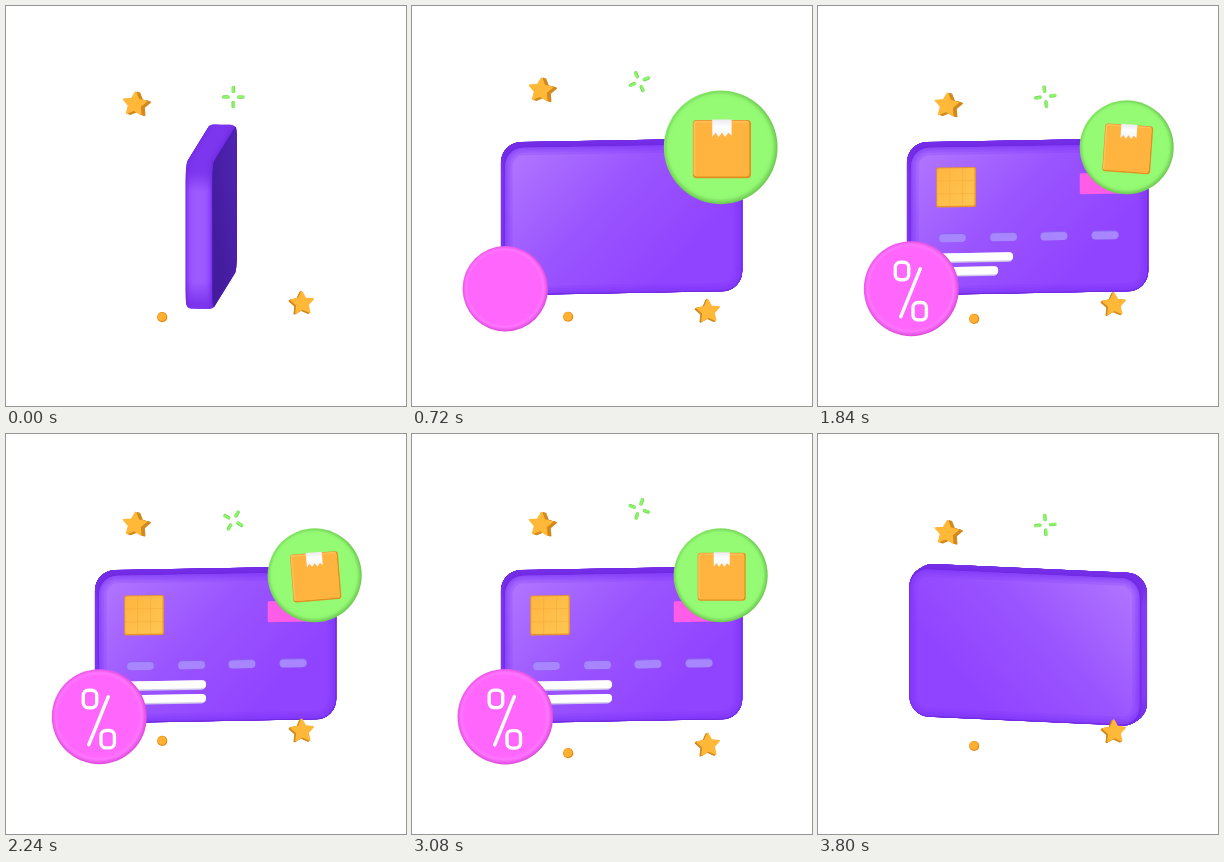
Recreate the animation shown at these times as an HTML page with a canvas. Size 400 by 400 pixels, loop 3840 ms.

```html
<!DOCTYPE html>
<html lang="en">
<head>
<meta charset="utf-8">
<title>Card</title>
<style>
html, body { margin: 0; width: 100%; height: 100%; overflow: hidden; background: #fff; }
canvas { display: block; width: 400px; height: 400px; }
</style>
</head>
<body>
<canvas id="stage" width="400" height="400"></canvas>
<script>
const LOOP = 3840, STEP = 40, TAU = Math.PI * 2, RAD = Math.PI / 180;
const g = document.getElementById('stage').getContext('2d');

const clamp = v => Math.max(0, Math.min(1, v));
const prog = (t, start, len) => clamp((t - start) / len);
const outQuad = p => 1 - (1 - p) * (1 - p);
const outBack = p => p <= 0 ? 0 : 1 + 2.7 * (p - 1) ** 3 + 1.7 * (p - 1) ** 2;
const mix = (a, b, k) => `rgb(${a.map((v, i) => Math.round(v + (b[i] - v) * k))})`;

// Keys are [time, value]; values ease in and out between neighbours.
function track(keys, t) {
  if (t <= keys[0][0]) return keys[0][1];
  for (let i = 1; i < keys.length; i++) {
    const [t0, a] = keys[i - 1], [t1, b] = keys[i];
    if (t < t1) return a + (b - a) * (1 - Math.cos(Math.PI * (t - t0) / (t1 - t0))) / 2;
  }
  return keys[keys.length - 1][1];
}

const PINK_IN = [[400, 0], [560, 1.22], [720, 0.9], [940, 1.11], [1160, 1], [3040, 1], [3300, 1.11]];
const GREEN_IN = [[560, 0], [720, 1.21], [960, 0.9], [1180, 1.11], [1400, 1], [3140, 1], [3410, 1.11]];
const BOX_TILT = [[720, 0], [1240, -6], [1840, 4], [2300, -5], [2680, 0]];

function badgeScale(keys, t) {
  const late = t - keys[keys.length - 1][0];
  return late > 0 ? Math.max(0, 1.11 - 1.22e-5 * late * late) : track(keys, t);
}

const bob = (t, mid, amp, peak) => mid + amp * Math.cos(TAU * (t - peak) / (LOOP / 2));

function at(x, y, draw, scale = 1, turn = 0) {
  if (scale <= 0) return;
  g.save();
  g.translate(x, y);
  g.rotate(turn * RAD);
  g.scale(scale, scale);
  draw();
  g.restore();
}

function roundRect(x, y, w, h, r) {
  g.beginPath();
  g.roundRect(x, y, w, h, r);
}

function pill(x, y, w, h, r, fill) {
  roundRect(x, y, w, h, r);
  g.fillStyle = fill;
  g.fill();
}

function disc(r, fill, x = 0, y = 0) {
  g.beginPath();
  g.arc(x, y, r, 0, TAU);
  g.fillStyle = fill;
  g.fill();
}

function withStops(grad, stops) {
  stops.forEach(([k, c]) => grad.addColorStop(k, c));
  return grad;
}

const linear = (x0, y0, x1, y1, stops) => withStops(g.createLinearGradient(x0, y0, x1, y1), stops);

// ---- card ----
const W = 241, H = 150, DEPTH = 27, PITCH = 0.17, BEVEL = 6;

function yaw(t) {
  if (t < 3265) {
    const p = prog(t, 40, 560);
    return -96 + 102 * (p >= 1 ? 1 : 1 - 2 ** (-10 * p));
  }
  return 6 + 258 * 2 ** (10 * (t - 3265) / 575 - 10);
}

function cardFace(facing) {
  roundRect(-W / 2 + 2, -H / 2 + 2, W - 4, H - 4, 18);
  g.save();
  g.clip();
  const k = clamp((facing - 0.1) / 0.7);
  g.fillStyle = linear(-95, -70, 40, 60, [
    [0, mix([78, 36, 176], [174, 114, 255], k)],
    [0.5, mix([72, 32, 166], [154, 84, 255], k)],
    [1, mix([66, 28, 156], [145, 68, 255], k)]
  ]);
  g.fillRect(-W / 2, -H / 2, W, H);
  g.strokeStyle = mix([74, 34, 170], [122, 52, 242], k);
  g.globalAlpha = 0.2;
  for (const w of [15, 10, 6, 3]) {
    g.lineWidth = w;
    g.stroke();
  }
  g.restore();
}

function cardDetails(t) {
  at(-73.3, -33, () => {
    pill(-20, -20, 40, 40, 2, '#e8942a');
    pill(-19, -19, 37.5, 37.5, 1.5, linear(-19, -19, 19, 19, [[0, '#ffb640'], [1, '#ffc652']]));
    g.fillStyle = 'rgba(232, 148, 42, 0.25)';
    for (const d of [-7, 6]) {
      g.fillRect(d, -19, 1, 37.5);
      g.fillRect(-19, d, 37.5, 1);
    }
  }, outBack(prog(t, 880, 280)));

  at(72, -34.3, () => pill(-21, -10.5, 42, 21, 1.5, '#ff5ce8'), outBack(prog(t, 960, 240)));

  [-77, -25.6, 25, 76.5].forEach((x, i) =>
    at(x, 17.2, () => {
      pill(-14, -4.5, 28, 9, 4.5, '#8a63ee');
      pill(-13.5, -3.5, 27, 8, 4, '#a886ff');
    }, outQuad(prog(t, 1200 + i * 80, 200))));

  [[37.5, 1540], [51.2, 1640]].forEach(([y, start]) => {
    const len = 80 * outQuad(prog(t, start, 400));
    if (len < 1) return;
    pill(-91, y - 4.5, len, 9.5, Math.min(4.7, len / 2), '#d2cbe8');
    pill(-91, y - 4.5, len, 8, Math.min(4, len / 2), '#ffffff');
  });
}

function card(t) {
  const a = yaw(t) * RAD, c = Math.cos(a), s = Math.sin(a);
  const front = c > 0 ? 1 : -1, half = DEPTH / 2;
  const plane = (z, draw) => {
    g.save();
    g.transform(c, -s * PITCH, 0, 1, 209.2 + (4 + z) * s, 210.7 + z * c * PITCH);
    draw();
    g.restore();
  };
  for (let i = 0; i <= DEPTH * 2; i++) {
    const z = front * (i / 2 - half);
    const over = Math.max(0, Math.abs(z) - (half - BEVEL));
    const inset = (BEVEL - Math.sqrt(BEVEL * BEVEL - over * over)) * 0.5;
    const lit = (1 - (z / half) ** 4) * (0.25 + 0.75 * Math.abs(s));
    const side = mix([112, 38, 234], [156, 90, 255], lit);
    const dim = mix([112, 40, 226], [124, 54, 238], lit);
    plane(z, () => pill(-W / 2 + inset, -H / 2 + inset, W - 2 * inset, H - 2 * inset, 20 - inset,
      linear(0, -H / 2, 0, H / 2, [[0, dim], [0.07, dim], [0.2, side], [0.8, side], [0.95, dim], [1, dim]])));
  }
  plane(front * half, () => {
    cardFace(Math.abs(c));
    if (front > 0) cardDetails(t);
  });
}

// ---- badges ----
function badge(r, rim, mid, light) {
  disc(r, linear(-r, -r, r, r, [[0, mid], [0.5, rim], [1, rim]]));
  disc(r - 0.8, withStops(g.createRadialGradient(-1, -1, r * 0.6, -0.5, -0.5, r), [
    [0, mid], [0.6, mid], [0.78, light], [1, rim]
  ]));
}

function zero(x, y, scale) {
  at(x, y, () => {
    roundRect(-6.7, -8.7, 13.4, 17.4, 5);
    g.stroke();
  }, scale);
}

function pinkBadge(t) {
  at(93.3, 282.7, () => {
    badge(47.5, '#e04ede', '#ff66fb', '#ff74ff');
    g.strokeStyle = '#fff';
    g.lineWidth = 3.4;
    g.lineCap = 'round';
    zero(-9.3, -17.7, outBack(prog(t, 1080, 240)));
    const p = outQuad(prog(t, 1260, 240));
    if (p > 0) {
      g.beginPath();
      g.moveTo(9, -20);
      g.lineTo(9 - 19.5 * p, -20 + 48 * p);
      g.stroke();
    }
    zero(8.4, 22.5, outBack(prog(t, 1400, 240)));
  }, badgeScale(PINK_IN, t));
}

function parcel() {
  pill(-24, -24, 48, 48, 3, '#e0901f');
  pill(-23.5, -23.5, 46, 46, 2.5, '#ffc05a');
  pill(-22, -22, 44.5, 44.5, 2, '#ffb440');
  g.beginPath();
  g.moveTo(-8, -24.5);
  g.lineTo(8, -24.5);
  g.lineTo(8, -11);
  for (let i = 1; i <= 6; i++) g.lineTo(8 - i * 16 / 6, i % 2 ? -13.5 : -10);
  g.closePath();
  g.fillStyle = linear(0, -24, 0, -10, [[0, '#ececf2'], [0.4, '#ffffff'], [1, '#f2f0f2']]);
  g.fill();
}

function greenBadge(t) {
  at(308.7, 141.3, () => {
    badge(47, '#70cc54', '#96fb74', '#92f872');
    at(1, 1.5, parcel, 1, track(BOX_TILT, t));
  }, badgeScale(GREEN_IN, t));
}

// ---- floating bits ----
function starPath(r) {
  g.beginPath();
  for (let i = 0; i < 10; i++) {
    const a = i * Math.PI / 5 - Math.PI / 2, d = i % 2 ? r * 0.5 : r;
    g.lineTo(d * Math.cos(a), d * Math.sin(a));
  }
  g.closePath();
}

function star(x, y, r, turn, dx) {
  const layer = (fill, ox, oy) => at(x + ox, y + oy, () => {
    starPath(r);
    g.fillStyle = g.strokeStyle = fill;
    g.lineJoin = 'round';
    g.lineWidth = 1.6;
    g.fill();
    g.stroke();
  }, 1, turn);
  for (let k = 4; k > 0; k--) layer('#d28a20', dx * k / 4, k / 4);
  layer('#ffb838', -dx / 4, 0);
}

function sparkle(t) {
  at(227.3, bob(t, 82, 9, 0), () => {
    for (let i = 0; i < 4; i++) {
      g.rotate(Math.PI / 2);
      pill(3.7, -1.6, 7.6, 3.4, 1.7, '#6fd650');
      pill(3.7, -1.6, 7.4, 2.6, 1.3, '#8cf468');
    }
  }, 1, 360 * t / LOOP);
}

function dot(t) {
  at(156.2, bob(t, 313.5, 6.7, 1330), () => {
    disc(5.1, '#e08a1c');
    disc(4.3, '#ffb030', -0.3, -0.4);
  });
}

function render(t) {
  g.clearRect(0, 0, 400, 400);
  sparkle(t);
  star(129.3, bob(t, 92, 8, 1700), 12, 5, 3.2);
  dot(t);
  card(t);
  star(296, bob(t, 303.5, 7.5, 1130), 11.6, -3, -1.4);
  pinkBadge(t);
  greenBadge(t);
}

const begin = performance.now();
function tick() {
  const t = (performance.now() - begin) % LOOP;
  render(Math.floor(t / STEP) * STEP);
  requestAnimationFrame(tick);
}
tick();
</script>
</body>
</html>
```
